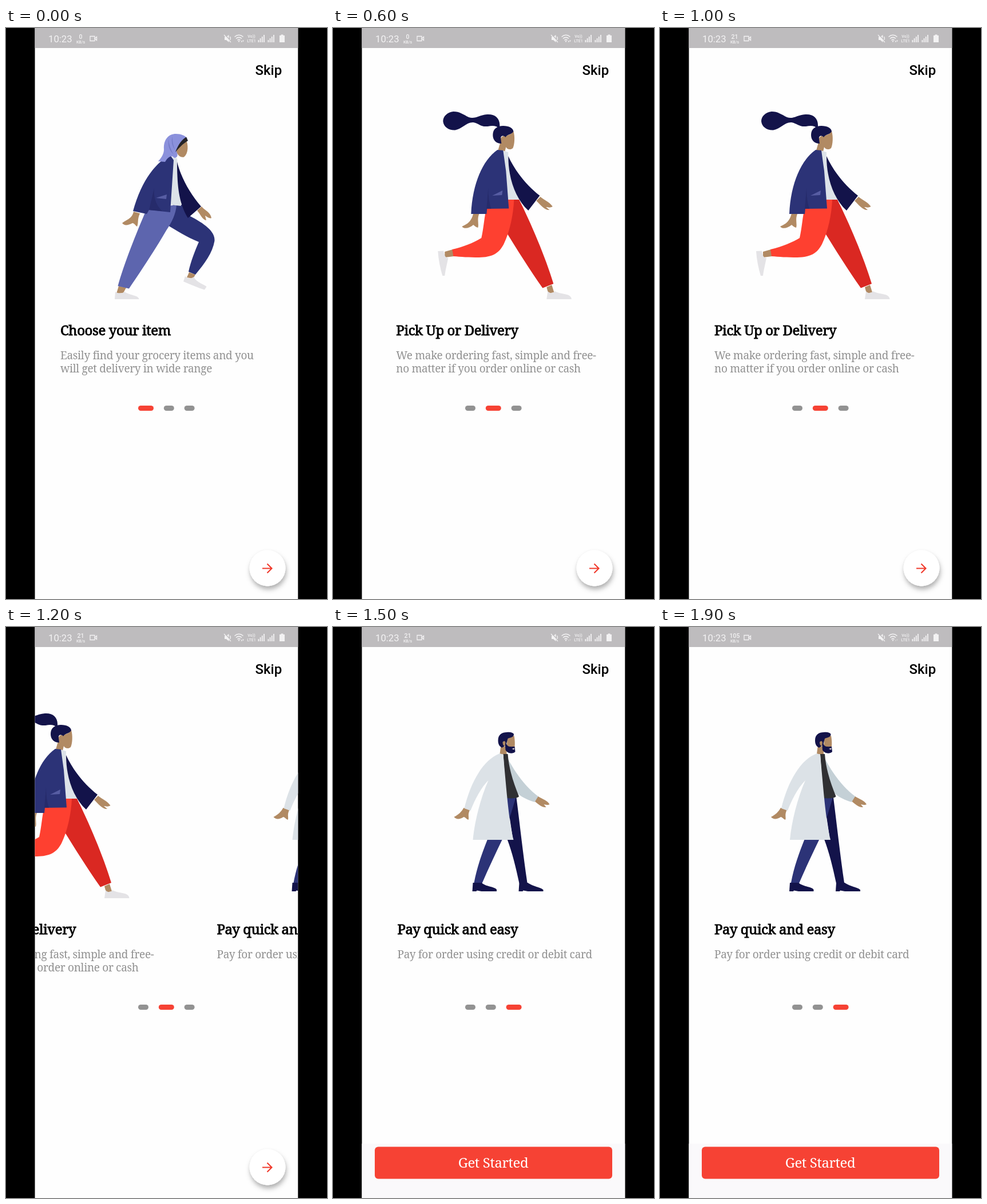
Recreate the animation shown at these times as an HTML page. Size 561 by 998 pixels, loop 2900 ms.

```html
<!DOCTYPE html>
<html lang="en">
<head>
<meta charset="utf-8">
<title>Onboarding</title>
<style>
  html, body { margin: 0; width: 100%; height: 100%; overflow: hidden; background: #000; }
  svg { display: block; width: 100vw; height: 100vh; }
  .ui { font-family: Roboto, sans-serif; }
  .slab { font-family: "Noto Serif", serif; letter-spacing: -.4px; }
  .title { font-size: 24px; stroke: #000; stroke-width: .85; }
  .body { font-size: 19px; fill: #919191; letter-spacing: -.33px; }
  .tiny { font-size: 7px; font-weight: 500; text-anchor: middle; }
</style>
</head>
<body>
<svg viewBox="0 0 561 998">
  <defs>
    <clipPath id="screen"><path d="M50.500 0h459.800v998h-459.800z"/></clipPath>
    <filter id="shadow" x="-40%" y="-40%" width="180%" height="190%">
      <feDropShadow dx="1.500" dy="6" stdDeviation="4.500" flood-opacity=".28"/>
      <feDropShadow dx="0" dy="1" stdDeviation="2.500" flood-opacity=".06"/>
    </filter>
  </defs>
  <rect width="561" height="998"/>
  <g clip-path="url(#screen)">
    <rect x="50" width="461" height="998" fill="#fefefe"/>
    <g id="pages"></g>
    <g id="dots"></g>

    <g id="next">
      <circle cx="457" cy="944" r="31.500" fill="#fff" filter="url(#shadow)"/>
      <path d="M448 944.500h16.500M456.500 936.500l8 8-8 8" fill="none" stroke="#f03a2c" stroke-width="2.100"/>
    </g>
    <g id="start">
      <rect x="50" y="903" width="461" height="95" fill="#faf9fb"/>
      <rect x="73" y="908.500" width="415" height="56" rx="6" fill="#f64234"/>
      <text class="slab" x="280" y="944.500" font-size="24" fill="#fff" text-anchor="middle">Get Started</text>
    </g>

    <text class="ui" x="435.500" y="82" font-size="24" font-weight="500">Skip</text>

    <rect x="50" width="461" height="35" fill="#bebcbe"/>
    <g class="ui" fill="#f3f2f3">
      <text x="74" y="25" font-size="16.700">10:23</text>
      <text id="rate" x="130.500" y="19" font-size="10.500" font-weight="500" text-anchor="middle"></text>
      <text class="tiny" x="130.500" y="26.500">KB/s</text>
      <path d="M147 14.500h8v8h-8zM155 18.500l3.500-3v6z" fill="none" stroke="#f3f2f3" stroke-width="1.300"/>
      <path d="M382 15.500h3l4.500-3.500v13l-4.500-4h-3z"/>
      <path d="M382.500 11.500l11.500 12.500" stroke="#bebcbe" stroke-width="1.500"/>
      <path d="M381 12l12 13M391.500 15q2 3 0 6" fill="none" stroke="#f3f2f3" stroke-width="1.200"/>
      <path d="M399.500 15.500q7.500-6.500 15 0M402 18.500q5-4.300 10 0M404.500 21.300q2.500-2 5 0" fill="none" stroke="#f3f2f3" stroke-width="1.500"/>
      <path d="M405.200 22.500h3.600l-1.800 2.500z"/>
      <path id="traffic" d="M410.500 24.500l1.300-3 1.300 3zM413.200 21.500h2.600l-1.300 3z"/>
      <text class="tiny" x="429" y="17">Vo))</text>
      <text class="tiny" x="429" y="25" font-size="8">LTE1</text>
      <path d="M440.500 21h1.800v4h-1.800zM443.700 18h1.800v7h-1.800zM446.900 15h1.800v10h-1.800zM450.100 12h1.800v13h-1.800z"/>
      <path d="M457.500 21h1.800v4h-1.800zM460.700 18h1.800v7h-1.800zM463.900 15h1.800v10h-1.800zM467.100 12h1.800v13h-1.800z"/>
      <path d="M480.500 11.500h4v1.500h2.500v12h-9v-12h2.500z"/>
    </g>
  </g>
</svg>
<script>
const WIDTH = 459.5, LOOP = 2900, STEP = 100;
const RED = '#f64234', GREY = '#929292';
const NAVY = '#2c3377', INK = '#13134a', SKIN = '#b18a63', SHOE = '#e4e3e6', SHIRT = '#dde3e9';
const $ = id => document.getElementById(id);

const pages = [
  {
    title: 'Choose your item',
    body: ['Easily find your grocery items and you', 'will get delivery in wide range'],
    art: [
      [SKIN, 'M197 451L210 454L205 463L193 464ZM320 427L331 431L327 438L316 436Z'],
      [SHOE, 'M191 461C197 465 203 464 207 461C215 467 232 467 232.500 474H190ZM313 434C318 439 325 438 328 435C333 445 348 449 350.500 452L347 457.500C335 454 322 448 310 443Z'],
      [NAVY, 'M292 309H308L322 329C345 341 366 355 364.500 372C361 393 347 412 331 431L319 426C323 408 330 390 337 374C315 365 298 354 283 345Z'],
      [SKIN, 'M223 321L234 324C229 335 232 341 229 347C226 345 224 341 221 341C213 345 207 346 203 341C210 335 220 334 223 321ZM334 319L342 312C347 319 357 321 359 332C356 334 352 330 348 328L350 336C344 336 340 326 334 319Z'],
      ['#5d65ae', 'M246 316L298 309C297 325 290 339 280 354C259 390 235 426 215 455.500L195.500 451C206 413 227 360 246 316Z'],
      [SHIRT, 'M291 224L299 228L306 311L287 309Z'],
      [NAVY, 'M287 222C258 238 236 270 222 320L246 325L250 318L287 322L293 231Z'],
      ['#262b6b', 'M259 280L250 318L273 320Q257 305 259 280Z'],
      ['#575da3', 'M262 297L281 291L280 299Z'],
      [INK, 'M299 234C306 262 322 290 341 312L318 332C303 308 299 280 299 234Z'],
      [SKIN, 'M297 214L314 193C319 204 319 219 311 225.500C305 227 299 222 297 214Z'],
      ['#8b91dc', 'M276 212C275 195 284 185 297 185C306 185 313 188 317 193C308 199 301 206 298 216C301 222 300 227 294 227C290 221 283 225 278 234L266 233C272 226 276 220 276 212Z'],
      ['#242328', 'M296 217C301 204 307 195 315 190.500L318 197C308 203 302 210 296 217Z'],
      ['#737ac7', 'M284 194Q285 209 293 221Q282 211 284 194ZM291 189Q290 203 296 214Q287 203 291 189Z'],
    ],
  },
  {
    title: 'Pick Up or Delivery',
    body: ['We make ordering fast, simple and free-', 'no matter if you order online or cash'],
    art: [
      [INK, 'M276 172C277 158 268 150 254 151C240 152 232 160 222 156C212 151 206 146 195 146C184 147 177 155 177 163C178 173 187 179 198 178.500C211 176 218 164 230 165C240 167 243 173 255 172C264 170 271 171 274 175Z'],
      [SKIN, 'M286 189C291 187 297 186 300 180C303 190 302 204 299 210C296 213 289 213 287 208L285 216L273 214L277 200C275 194 280 187 286 189Z'],
      [INK, 'M264 187C264 176 272 171 282 171C292 171 300 175 300 181C296 187 290 185 286 191C283 187 277 188 278 194L279 202C270 202 264 196 264 187Z'],
      [SKIN, 'M180 391L194 387L196 399L180 401ZM358 453L367 449L371 462L361 464Z'],
      [SHOE, 'M168 390L178 389.500C179 397 181 402 186 402C184 412 181 424 180 433H176C172 420 169 405 168 390ZM360 460C364 465 370 463 372 460C382 466 401 463 401.500 474H358Z'],
      [SKIN, 'M230 324L240 325C236 335 240 342 238 349C234 348 231 345 230 344C223 350 214 352 210 347C218 343 226 340 230 324ZM340 302L347 295C355 302 362 303 368.500 312C364 315 360 313 357 313L363 318C355 319 347 309 340 302Z'],
      ['#da2822', 'M298 300H310C330 340 356 400 370 447L351 454.500C330 425 305 385 287 356C295 335 297 315 298 300Z'],
      ['#fe4030', 'M253 314H290V300H301C300 325 294 355 283 378C274 395 262 400.500 240 401C222 401 208 400 195 399L193 387C215 382 232 374 244 367C248 350 249 330 253 314Z'],
      [SHIRT, 'M281 214L291 217C290 245 297 275 310 300H289Z'],
      [NAVY, 'M272 213C245 232 228 275 226 325H253L254 316L292 315.500L287 250L282 214Z'],
      ['#262b6b', 'M256 280L253 316L261 316Q256 300 256 280Z'],
      ['#575da3', 'M263 293L281 284L280 292Z'],
      [INK, 'M291 224C304 252 324 276 346 293L326 319C303 298 291 262 291 224Z'],
    ],
  },
  {
    title: 'Pay quick and easy',
    body: ['Pay for order using credit or debit card'],
    art: [
      [SKIN, 'M276 206L286 210V223L274 222ZM287 194L299 190C301 200 300.500 210 299 216L286 213Z'],
      [INK, 'M271 198C271 188 278 184 286 184C293 183 297 185 298.500 187C299 193 292 193 288 195L285 206L278 211C272 208 271 203 271 198Z'],
      [INK, 'M285 201C286 211 293 209 300 209L301 218C297 222 288 222 284 215L283 203Z'],
      [SKIN, 'M279 201Q283 197 284 202L283 208Q279 208 279 201Z'],
      ['#f1e9e6', 'M295 213L299.500 211.500L299 214.500Z'],
      [SKIN, 'M211 316L222 319C217 329 221 333 219 337C215 335 213 332 211 332C205 336 198 337 194 332C202 328 207 323 211 316ZM334 304L341 296C350 302 356 302 361 310C357 312 353 310 351 310L355 315C347 316 341 309 334 304Z'],
      [INK, 'M286 298H303C309 345 315 400 322 447L308 448C302 420 296 395 287 371L296 365Z'],
      [NAVY, 'M285 298H302L290 338ZM253 370H279C267 395 255 420 243 448L229 447C234 420 243 395 253 370Z'],
      [INK, 'M227 447H242C250 454 266 454 268.500 459V462H242L234 460.500L233 462H226ZM308 447H323C332 454 347 455 350 459.500V462H323L315 460.500L314 462H307Z'],
      ['#c4d0d6', 'M288 230C304 260 322 282 341 296L335 306C312 299 298 290 288 262Z'],
      ['#303033', 'M280 222H288C290 250 299 275 307.500 296C306 299 298 300 285 299Z'],
      ['#dce2e7', 'M274 221C243 233 222 275 212 317L223 321C229 305 240 282 254 268C240 300 230 340 227 372H298C290 340 286 290 280 223Z'],
    ],
  },
];

const pageMarkup = ({ title, body, art }, i) => `<g transform="translate(${i * WIDTH})">
  ${art.map(([fill, d]) => `<path fill="${fill}" d="${d}"/>`).join('')}
  <text class="slab title" x="95" y="537">${title}</text>
  ${body.map((line, n) => `<text class="slab body" x="95" y="${579 + 23 * n}">${line}</text>`).join('')}
</g>`;
$('pages').innerHTML = pages.map(pageMarkup).join('');

// Each swipe follows the finger, then settles exponentially; step counts 100 ms ticks.
const settle = (left, ticks) => WIDTH - left * 0.4 ** ticks;
function scrollAt(step) {
  if (step < 3) return [0, 25, 115][step];
  if (step < 5) return settle(239.5, 0);
  if (step < 10) return settle(239.5, step - 3);
  if (step === 10) return WIDTH;
  if (step === 11) return WIDTH + 65;
  return step < 19 ? WIDTH + settle(273.5, step - 12) : 2 * WIDTH;
}

function dotsMarkup(active) {
  let x = 231;
  return pages.map((_, i) => {
    const w = i === active ? 27 : 18;
    const dot = `<rect x="${x}" y="660" width="${w}" height="9" rx="4.5" fill="${i === active ? RED : GREY}"/>`;
    x += w + 17.8;
    return dot;
  }).join('');
}

function render(ms) {
  const step = Math.floor(ms / STEP);
  const scroll = scrollAt(step);
  const page = Math.round(scroll / WIDTH);
  const last = page === pages.length - 1;
  $('pages').setAttribute('transform', `translate(${-scroll})`);
  $('dots').innerHTML = dotsMarkup(page);
  $('next').style.display = last ? 'none' : '';
  $('start').style.display = last ? '' : 'none';
  $('rate').textContent = step < 8 ? '0' : step < 18 ? '21' : '105';
  $('traffic').style.opacity = last ? 0.4 : 1;
}

const begin = performance.now();
function tick() {
  render((performance.now() - begin) % LOOP);
  requestAnimationFrame(tick);
}
tick();
</script>
</body>
</html>
```
